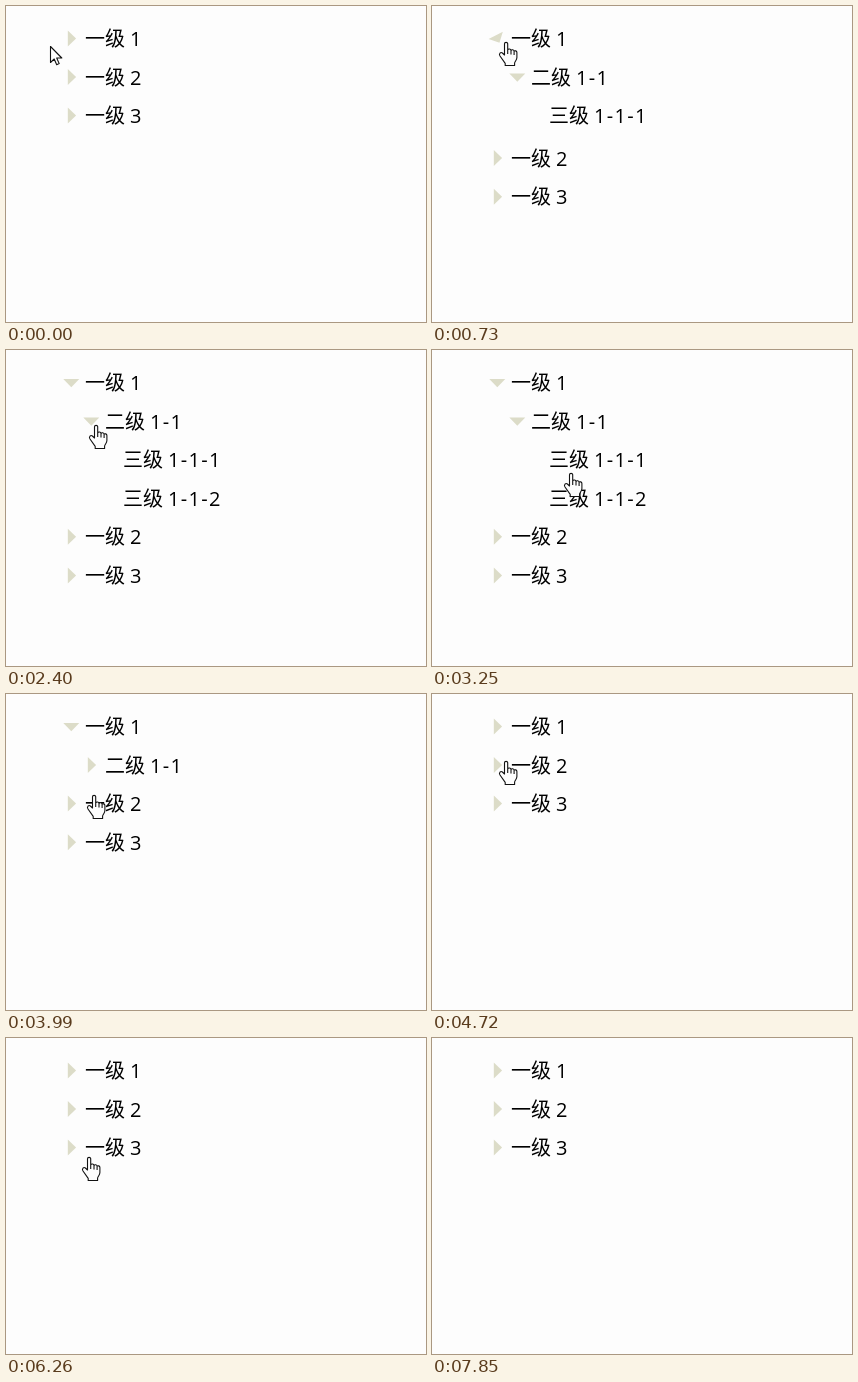
These frames come from a looping animation (420 by 316 pixels, 8010 ms). An HTML page with a canvas:

```html
<!DOCTYPE html>
<html lang="zh">
<head>
<meta charset="utf-8">
<style>
  html, body { margin: 0; width: 100%; height: 100%; overflow: hidden; background: #fdfdfd; }
  canvas { display: block; width: 420px; height: 316px; }
</style>
</head>
<body>
<canvas id="stage"></canvas>
<script>
const LOOP = 8010, SLIDE = 300, TRAVEL = 400, PAUSE = 250;
const TOP = 13.4, ROW = 38.6, PAPER = '#fdfdfd';
const canvas = document.getElementById('stage');
const ctx = canvas.getContext('2d');
const ratio = window.devicePixelRatio || 1;
canvas.width = 420 * ratio;
canvas.height = 316 * ratio;

// where the pointer stops: time, tip, and the node it clicks there
const stops = [
  { at: 0, x: 44, y: 40 },
  { at: 540, x: 74, y: 36, click: '1' },
  { at: 1270, x: 160, y: 138 },
  { at: 2400, x: 90, y: 75, click: '1-1' },
  { at: 2840, x: 90, y: 75, click: '1-1' },
  { at: 3230, x: 141, y: 125 },
  { at: 3640, x: 90, y: 75, click: '1-1' },
  { at: 3980, x: 88, y: 102 },
  { at: 4400, x: 74, y: 36, click: '1' },
  { at: 5040, x: 74, y: 70, click: '2' },
  { at: 5400, x: 109, y: 123 },
  { at: 5860, x: 74, y: 70, click: '2' },
  { at: 6510, x: 83, y: 119, click: '3' },
  { at: 7080, x: 83, y: 119, click: '3' },
  { at: 7800, x: 335, y: 318 }
];

function makeNode(path, children, open = false) {
  const depth = path.split('-').length - 1;
  return {
    level: '一二三'[depth] + '级',
    path,
    children,
    open,
    x: children ? 79 + 20 * depth : 57 + 30 * depth,
    clicks: stops.filter(stop => stop.click === path).map(stop => stop.at)
  };
}
const leaves = path => [1, 2].map(i => makeNode(`${path}-${i}`));
const tree = [
  makeNode('1', [makeNode('1-1', leaves('1-1'), true)]),
  makeNode('2', leaves('2')),
  makeNode('3', leaves('3'))
];

const hand = new Path2D('M-1.5 13V1.8C-1.5-.1 1.7-.1 1.7 1.8V8C2.2 6.6 4.8 6.8 5 8.4C5.6 7.2 8 7.6 8.1 9.2C8.7 8.3 10.9 8.8 10.9 10.6V15.5C10.9 18 9 19.2 8.6 21V23.5H-.8V21.4L-6 14C-7.6 11.6-5.2 9.6-3.6 11ZM1.7 8V12M5 8.4V12.4M8.1 9.2V13');
const arrow = new Path2D('M.5.5V16.5L4.2 13L6.7 18.7L9.2 17.6L6.7 12H11.8Z');

const clamp = p => Math.min(1, Math.max(0, p));
const ease = p => p * p * (3 - 2 * p);
const mix = (a, b, p) => a + (b - a) * p;

// 0 is closed, 1 is open; every click eases towards the other state
const openness = (node, t) => node.clicks.reduce((amount, click, i) => {
  const opens = node.open === (i % 2 === 1);
  return amount + (opens ? 1 : -1) * ease(clamp((t - click) / SLIDE));
}, Number(node.open));

const height = (nodes, t) => nodes.reduce((sum, node) =>
  sum + ROW + (node.children ? openness(node, t) * height(node.children, t) : 0), 0);

function drawLabel({ level, path, x }, middle) {
  const baseline = Math.round(middle + 7.3);
  ctx.fillStyle = '#000';
  ctx.letterSpacing = '0px';
  ctx.font = '20px "Noto Sans CJK SC", "Noto Sans CJK", sans-serif';
  ctx.fillText(level, x, baseline);
  ctx.letterSpacing = '1.3px';
  ctx.font = '20px "Open Sans", "Noto Sans", sans-serif';
  ctx.fillText(path, x + 45, baseline);
}

function drawCaret(x, y, turn) {
  ctx.save();
  ctx.translate(x, y);
  ctx.rotate(turn * Math.PI / 2);
  ctx.fillStyle = '#dcdcc8';
  ctx.fill(new Path2D('M-3.5-8L4.8 0L-3.5 8Z'));
  ctx.restore();
}

// draws rows from y downwards and returns the next free y
function drawNodes(nodes, y, t) {
  for (const node of nodes) {
    const middle = y + ROW / 2;
    drawLabel(node, middle);
    y += ROW;
    if (!node.children) continue;
    const open = openness(node, t);
    const shown = open * height(node.children, t);
    drawCaret(node.x - 13.7, middle - .3, open);
    if (shown < .01) continue;
    ctx.save();
    ctx.beginPath();
    ctx.rect(0, y, 420, shown);
    ctx.clip();
    drawNodes(node.children, y, t);
    ctx.restore();
    y += shown;
  }
  return y;
}

// the pointer settles a moment before it clicks
function pointerAt(t) {
  let { x, y } = stops[0];
  stops.slice(1).forEach((stop, i) => {
    const arrive = stop.at - (stop.click ? PAUSE : 0);
    const leave = Math.max(stops[i].at, arrive - TRAVEL);
    const p = ease(clamp((t - leave) / (arrive - leave)));
    x = mix(x, stop.x, p);
    y = mix(y, stop.y, p);
  });
  return { x: Math.round(x), y: Math.round(y) };
}

function drawPointer(t, bottom) {
  const { x, y } = pointerAt(t);
  const shape = x > 54 && y < bottom ? hand : arrow;
  ctx.save();
  ctx.translate(x, y);
  ctx.fillStyle = PAPER;
  ctx.strokeStyle = '#111';
  ctx.lineWidth = 1.1;
  ctx.lineJoin = 'round';
  ctx.fill(shape);
  ctx.stroke(shape);
  ctx.restore();
}

function frame() {
  const t = performance.now() % LOOP;
  ctx.setTransform(ratio, 0, 0, ratio, 0, 0);
  ctx.fillStyle = PAPER;
  ctx.fillRect(0, 0, 420, 316);
  drawPointer(t, drawNodes(tree, TOP, t));
  requestAnimationFrame(frame);
}
frame();
</script>
</body>
</html>
```
